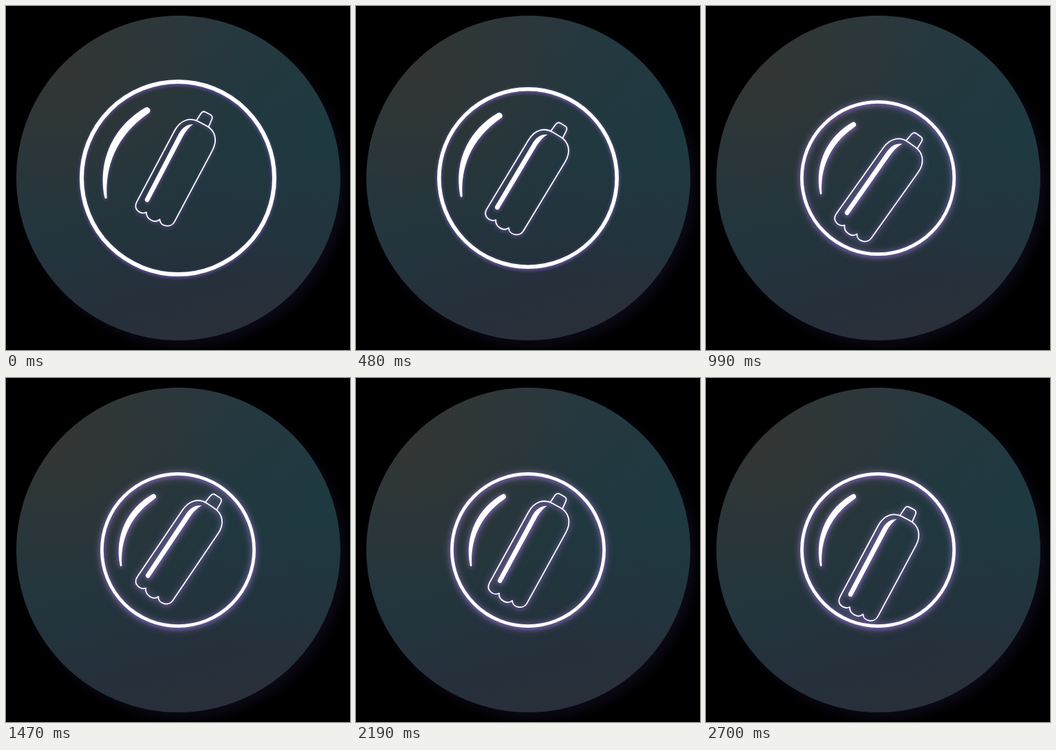
An HTML page for the animation above (2730 ms loop, 500 by 500 pixels).

```html
<!DOCTYPE html>
<html lang="en">
<head>
<meta charset="utf-8">
<title>Bottle in a bubble</title>
<style>
  html, body { margin: 0; width: 100%; height: 100%; overflow: hidden; background: #000; }
  svg { position: absolute; left: 0; top: 0; }
  #disc {
    position: absolute; left: 15px; top: 14px; width: 471px; height: 472px; border-radius: 50%;
    background:
      radial-gradient(circle at 14% 16%, rgba(58, 52, 45, .6), transparent 45%),
      radial-gradient(circle at 96% 38%, rgba(29, 59, 66, .7), transparent 45%),
      linear-gradient(165deg, #2a393f, #22363e 50%, #25303b 76%, #2c2f38);
    box-shadow: 8px 9px 16px #0b0916;
  }
</style>
</head>
<body>
<div id="disc"></div>
<svg width="500" height="500" viewBox="0 0 500 500">
  <g id="glow" fill="none" stroke="#fff" stroke-linejoin="round">
    <g id="bubble">
      <circle r="140" stroke-width="6"/>
      <path fill="#fff" stroke="none" d="M-47-102.5C-90-78-118-30-106.5 29a1.7 1.7 0 0 0 3.2-.4C-106-14-92-60-43-94a4.7 4.7 0 0 0-4-8.5z"/>
    </g>
    <g id="bottle" stroke-width="1.8">
      <path d="M-28.5 49V-68C-28.5-86-18-96-4-96H9C23-96 33.5-86 33.5-68V49C33.5 60 18 65 13 56C10 65-5 65-9 56C-14 63-28.5 62-28.5 49Z"/>
      <path d="M-7.5-96L-6.5-108q.6-5 5-5h8q4.4 0 5 5L12.5-96"/>
      <path fill="#fff" stroke="none" d="M-9-89C-17-85-21-78-21-66L-20 40a3.4 3.4 0 0 0 6.6 0L-14-66C-14-76-12-84-9-89z"/>
    </g>
  </g>
</svg>
<script>
const LOOP = 2730;
const [glow, bubble, bottle] = ["glow", "bubble", "bottle"].map(id => document.getElementById(id));

const clamp = x => Math.min(1, Math.max(0, x));
const smooth = x => x * x * (3 - 2 * x);
const steepInOut = x => x < .5 ? (2 * x) ** 2.7 / 2 : 1 - (2 - 2 * x) ** 2.7 / 2;

// Eased value between [time, value] keys
function track(keys, t) {
  let i = 1;
  while (i < keys.length - 1 && t > keys[i][0]) i++;
  const [t0, a] = keys[i - 1], [t1, b] = keys[i];
  return a + (b - a) * smooth(clamp((t - t0) / (t1 - t0)));
}

const xKeys = [[0, 238.3], [910, 241.3], [1820, 242.5], [LOOP, 243.3]];
const yKeys = [[0, 254.7], [910, 278.7], [1820, 257], [LOOP, 288]];
const tiltKeys = [[0, 28], [1080, 35.6], [2440, 28.2]];

function draw(now) {
  const t = now % LOOP;
  const scale = 1 - .21 * steepInOut(clamp(t / 1080));
  const shine = clamp((t - 300) / 780);
  bubble.setAttribute("transform", `translate(250 250) scale(${scale})`);
  bottle.setAttribute("transform",
    `translate(${track(xKeys, t)} ${track(yKeys, t)}) rotate(${track(tiltKeys, t)})`);
  glow.style.filter = "drop-shadow(.5px 2px 2.5px #6b57a6)" +
    ` drop-shadow(0 0 ${1 + 4 * shine}px rgba(170, 135, 215, ${.6 * shine}))`;
  requestAnimationFrame(draw);
}
requestAnimationFrame(draw);
</script>
</body>
</html>
```
